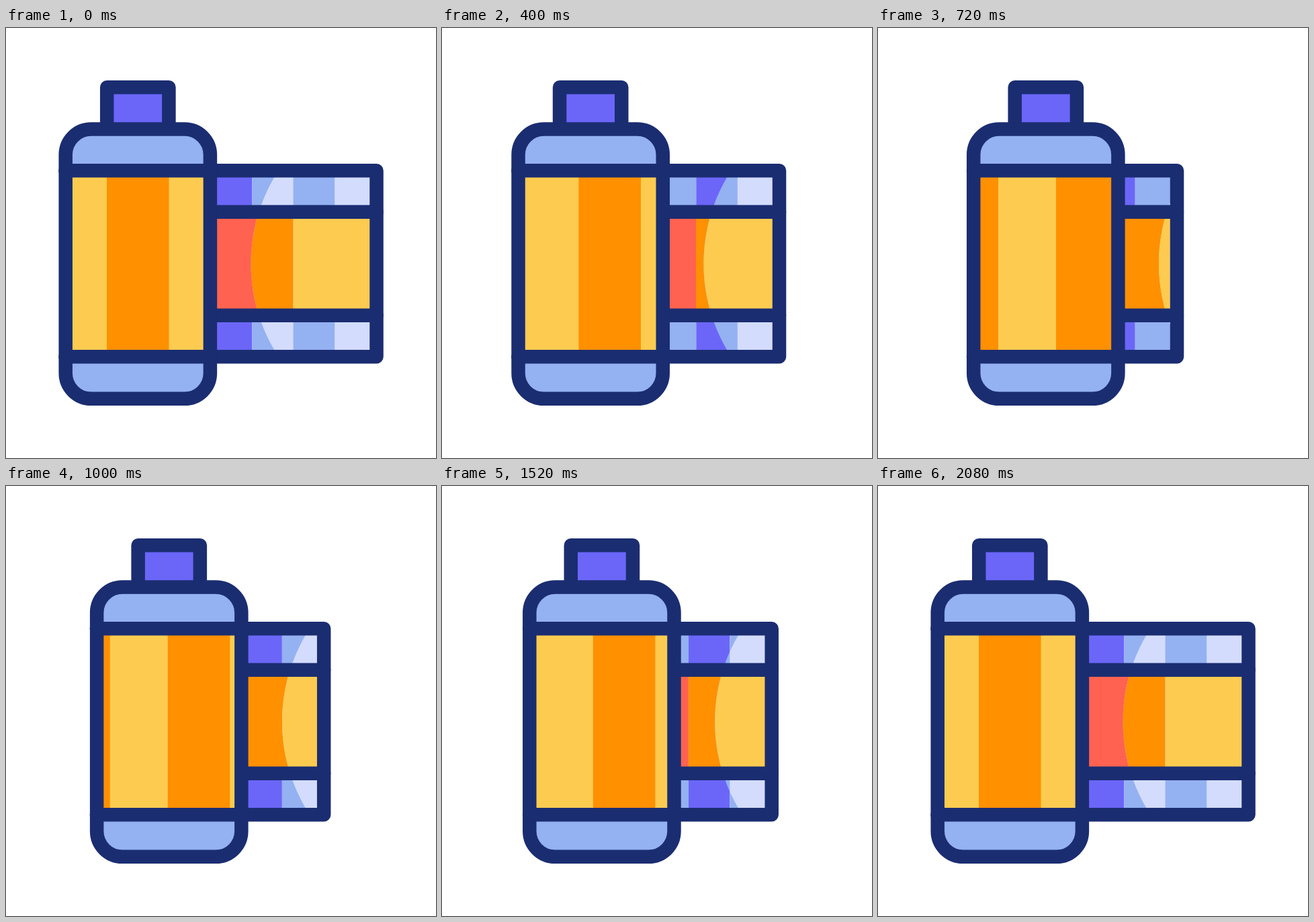
Animation, 640 px wide and 640 px high, one loop 2200 ms. Source, as an HTML page with a canvas:

```html
<!DOCTYPE html>
<html lang="en">
<head>
<meta charset="utf-8">
<title>Film roll</title>
<style>
  html, body { margin: 0; height: 100%; overflow: hidden; background: #fff; }
  canvas { display: block; width: 100vw; height: 100vh; }
</style>
</head>
<body>
<canvas id="stage" width="640" height="640"></canvas>
<script>
const LOOP = 2200, STEP = 40;
const NAVY = '#1b2d71', PURPLE = '#6b66f8', BLUE = '#94b1f2', PALE = '#d3dcfd';
const YELLOW = '#fdcb50', ORANGE = '#ff9000', RED = '#ff6250';
const CELL = 61.4;
const ctx = document.getElementById('stage').getContext('2d');

function ease(x) {
  x = Math.min(1, Math.max(0, x));
  const a = x ** 1.72, b = (1 - x) ** 1.72;
  return a / (a + b);
}

// Out to the peak, partly back to a rest pose, then home between start and end.
function travel(t, peak, rest, start, end) {
  const span = (from, to) => ease((t - from) / (to - from));
  return peak * span(110, 715)
    + (rest - peak) * span(715, 1215)
    - rest * span(start, end);
}

function rect(x, y, right, bottom, color) {
  ctx.fillStyle = color;
  ctx.fillRect(x, y, right - x, bottom - y);
}

function line(...points) {
  ctx.beginPath();
  for (let i = 0; i < points.length; i += 2) ctx.lineTo(points[i], points[i + 1]);
  ctx.stroke();
}

function filmColors(shift, odd, even, left, right) {
  for (let i = 0; i < 4; i++) {
    const x = 305 + shift + i * CELL;
    rect(x, 212, x + CELL, 490, i % 2 ? even : odd);
  }
  const edge = 427.5 + shift;
  rect(edge - 200, 274, edge, 427.5, left);
  rect(edge, 274, edge + 130, 427.5, right);
}

function drawFilm(body, shift) {
  const left = 304 + body, right = 551.5 + shift;
  ctx.save();
  ctx.beginPath();
  ctx.rect(left, 212, right - left, 278);
  ctx.clip();
  filmColors(shift, PURPLE, BLUE, RED, ORANGE);
  ctx.beginPath();
  ctx.arc(619.5 + body, 350.7, 255, 0, 2 * Math.PI);
  ctx.clip();
  filmColors(shift, BLUE, PALE, ORANGE, YELLOW);
  ctx.restore();
  line(left, 212.2, right, 212.2, right, 489.3, left, 489.3);
  for (const y of [273.8, 427.7]) line(left, y, right, y);
}

function drawBody(body, stripe) {
  ctx.save();
  ctx.translate(body, 0);
  rect(150.2, 88.2, 242.4, 150, PURPLE);
  line(150.2, 150, 150.2, 88.2, 242.4, 88.2, 242.4, 150);

  const shell = new Path2D();
  shell.roundRect(88.7, 150.6, 215.2, 401.2, 38);
  ctx.fillStyle = BLUE;
  ctx.fill(shell);
  rect(88.7, 212, 303.9, 489.5, YELLOW);
  ctx.save();
  ctx.clip(shell);
  for (const x of [150, -28.5]) {
    const start = x + stripe - body;
    rect(start, 212, start + 92.5, 489.5, ORANGE);
  }
  ctx.restore();
  ctx.stroke(shell);
  for (const y of [212.2, 489.3]) line(88.5, y, 303.9, y);
  ctx.restore();
}

function draw(now) {
  const t = Math.floor(now % LOOP / STEP) * STEP;
  const body = travel(t, 53.5, 42.1, 1480, 2040);
  const stripe = travel(t, 115, 75.8, 1480, 2040);
  const film = travel(t, -106.5, -61, 1500, 2045);

  rect(0, 0, 640, 640, '#fff');
  ctx.strokeStyle = NAVY;
  ctx.lineWidth = 20.5;
  ctx.lineCap = ctx.lineJoin = 'round';
  drawFilm(body, film);
  drawBody(body, stripe);
  requestAnimationFrame(draw);
}
requestAnimationFrame(draw);
</script>
</body>
</html>
```
